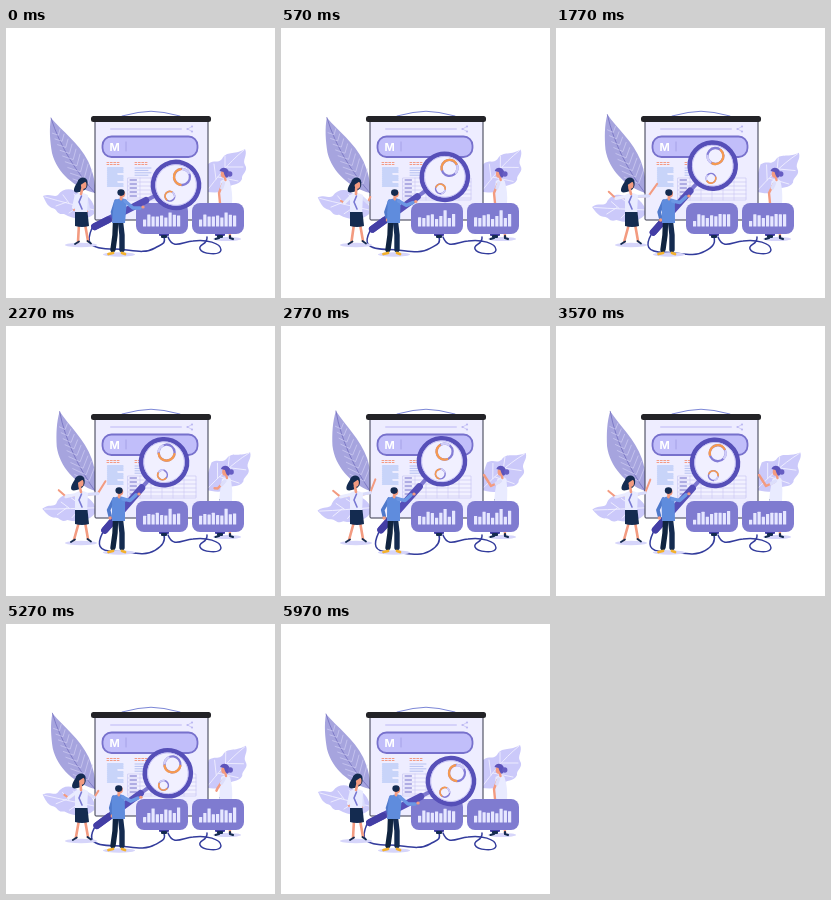
An HTML page with a canvas for the animation above (6010 ms loop, 269 px wide and 270 px high).

```html
<!DOCTYPE html>
<html lang="en">
<head>
<meta charset="utf-8">
<style>
html, body { margin: 0; width: 100%; height: 100%; overflow: hidden; background: #fff }
canvas { display: block; width: 269px; height: 270px }
</style>
</head>
<body>
<canvas id="stage"></canvas>
<script>
const LOOP = 6010, TAU = Math.PI * 2;
const canvas = document.getElementById('stage');
const c = canvas.getContext('2d');
const ratio = Math.max(1, window.devicePixelRatio || 1);
canvas.width = 269 * ratio;
canvas.height = 270 * ratio;
c.scale(ratio, ratio);
c.lineCap = c.lineJoin = 'round';

const NAVY = '#142b50', SKIN = '#f39b80', INK = '#433ea5', PURPLE = '#564fb8',
      PALE = '#cbc9fa', ORANGE = '#f5955c', SHIRT = '#e9ebff', SHADOW = '#d6d5fa',
      CABLE = '#333c9c';

function fill(d, color) { c.fillStyle = color; c.fill(new Path2D(d)); }
function stroke(d, color, width = 1) {
  c.strokeStyle = color;
  c.lineWidth = width;
  c.stroke(new Path2D(d));
}
const line = (color, width, ...pts) => stroke('M' + pts.join('L'), color, width);
function box(x, y, w, h, r, color, edge, width) {
  c.beginPath();
  c.roundRect(x, y, w, h, r);
  c.fillStyle = color;
  c.fill();
  if (edge) { c.strokeStyle = edge; c.lineWidth = width; c.stroke(); }
}
function oval(x, y, rx, ry, color) {
  c.beginPath();
  c.ellipse(x, y, rx, ry, 0, 0, TAU);
  c.fillStyle = color;
  c.fill();
}
function arc(x, y, r, from, to, color, width) {
  c.beginPath();
  c.arc(x, y, r, from, to);
  c.strokeStyle = color;
  c.lineWidth = width;
  c.stroke();
}
function turned(x, y, angle, draw) {
  c.save();
  c.translate(x, y);
  c.rotate(angle);
  draw();
  c.restore();
}
const smooth = (t, a, b) => {
  const k = Math.min(1, Math.max(0, (t - a) / (b - a)));
  return k * k * (3 - 2 * k);
};

// Closed smooth curve through values spread evenly over the loop.
function path(t, ...v) {
  const n = v.length, u = t / LOOP * n, i = Math.floor(u), f = u - i;
  const [a, b, d, e] = [n - 1, 0, 1, 2].map(k => v[(i + k) % n]);
  return b + f * (d - a + f * (2 * a - 5 * b + 4 * d - e + f * (3 * (b - d) + e - a))) / 2;
}

function leaves(p) {
  turned(89, 165, p * 0.13, () => {
    fill('M0 0C-20-5-38-20-43-40C-45-52-46-64-44-75C-33-62-16-50-7-32C-2-21 1-10 0 0Z', '#a6a4de');
    stroke('M0 0C-18-20-35-46-44-75', '#6f6bbd', .7);
    for (let i = 0; i < 9; i++) {
      const x = -7 - i * 3.7, y = -9 - i * 6.1, s = 1 - i * .075;
      line('#d5d3f6', .6, [x - 15 * s, y - 5 * s], [x, y], [x + 4 * s, y - 15 * s]);
    }
  });
  turned(88, 178, -p * 0.33, () => {
    fill('M0 8C-8 15-20 14-30 8C-38 9-36 3-42 2C-47 0-49-6-51-10C-43-13-40-8-36-11C-30-19-20-18-14-11C-6-12-2-6 0 0Z', PALE);
    stroke('M0 4C-15 0-32-4-49-9M-14 0L-25 7M-27-4L-38 0M-10 1L-20-12M-25-3L-31-11', '#f4f3ff', .8);
  });
  turned(200, 164, p * 0.146, () => {
    fill('M0 0C-2-10 0-18 2-28C9-33 11-28 16-33C21-42 27-36 39-43C42-37 36-32 39-27C43-21 35-18 36-13C33-6 25-9 20-3C14 2 6 0 0 0Z', PALE);
    stroke('M0 0C11-14 21-28 38-42M10-13L8-28M19-23L19-36M12-15L32-11M21-25L37-25', '#f4f3ff', .8);
  });
}

function board() {
  stroke('M116 88L132 84.5Q145 82 158 84.5L174 88', '#6c79d2', .9);
  box(89, 91, 113, 101, 1, '#eeedff', '#34364a', 1);
  box(85, 88, 120, 6, 2.5, '#232327');
  line('#d5d2fa', 2, [105, 101], [175, 101]);
  line('#c4c1f4', .8, [186, 98.5], [181.5, 101], [186, 103.5]);
  for (const [x, y] of [[186, 98.5], [181.5, 101], [186, 103.5]]) oval(x, y, 1.1, 1.1, '#bcb8f2');
  box(96.5, 108.5, 95, 20.5, 9, '#c1befa', '#7771cc', 1.8);
  c.fillStyle = '#fff';
  c.font = 'bold 11px Inter, "Liberation Sans", sans-serif';
  c.textAlign = 'center';
  c.fillText('M', 108.5, 122.5);
  line('#a09be3', .8, [120, 114], [120, 123]);

  for (const x of [101, 129]) for (const y of [134.5, 136.5])
    for (let i = 0; i < 4; i++) line('#f49b85', 1, [x + i * 3.4, y], [x + i * 3.4 + 1.8, y]);
  for (let i = 0; i < 10; i++) line('#a2bcf3', 1.2, [101.5, 140 + i * 2], [i % 4 === 3 ? 111 : 117, 140 + i * 2]);
  for (let i = 0; i < 4; i++) line('#a9b6ee', .8, [129, 140 + i * 2.4], [145 - i % 2 * 3, 140 + i * 2.4]);
  box(122, 150, 68, 22, 0, '#f2f1ff', '#c9c6f3', .7);
  for (let i = 0; i < 5; i++) {
    line('#c9c6f3', .7, [122, 154 + i * 4], [190, 154 + i * 4]);
    line('#c9c6f3', .6, [134 + i * 11, 150], [134 + i * 11, 172]);
    line('#6d68c8', 1, [124, 152 + i * 4], [130.5, 152 + i * 4]);
  }
}

const BARS = [7, 10, 12, 10, 9, 11, 14, 10, 13];
function panel(x, t) {
  box(x + 23, 203, 10, 5, 1, INK);
  box(x + 25, 207, 6, 3, 1, NAVY);
  box(x, 175, 52, 31, 8, '#7f7bd0');
  BARS.forEach((h, i) => {
    const high = h + 2.2 * Math.sin(t / LOOP * TAU * 3 + i * 2.1);
    box(x + 7 + i * 4.25, 198.5 - high, 3.2, high, .3, '#e6e7ff');
  });
}

function cables(endX, endY, p) {
  const low = 221 + p * 5;
  stroke(`M${endX} ${endY}C${endX - 6} ${low - 7} ${endX - 5} ${low} 108 ${low}C124 ${low} 137 ${low + 6} 149 ${low - 1}C156 ${low - 5} 160 216 158 209`, CABLE, 1.5);
  stroke('M162 209C167 222 176 214 187 213C200 211 215 215 215 222C214 228 196 226 194 221C192 216 202 217 201 209', CABLE, 1.5);
}

function ring(x, y, r, spin, width) {
  arc(x, y, r, 0, TAU, '#847dd6', width);
  arc(x, y, r, spin - 1.4, spin + 1.4, '#f79a4f', width);
  arc(x, y, r, spin + 1.7, spin + 2.6, '#d0cdf8', width);
}

function magnifier(x, y, endX, endY, spin) {
  const length = Math.hypot(endX - x, endY - y), angle = Math.atan2(endY - y, endX - x);
  turned(x, y, angle, () => {
    line('#7d77d0', 4, [24, 0], [35, 0]);
    line(PURPLE, 7, [34, 0], [length - 3, 0]);
    line(INK, 7, [length - 18, 0], [length - 3, 0]);
    oval(0, 0, 23, 23, '#f1f0ff');
    arc(0, 0, 23, 0, TAU, PURPLE, 4.6);
    arc(0, 0, 20.4, 0, TAU, '#bfbbf3', .8);
    ring(-9, 4.4, 8, spin - angle, 2.3);
    ring(10.6, -7.2, 4.8, spin - angle + .6, 1.6);
  });
}

function presenter(t) {
  const x = path(t, 75.5, 73, 72.5, 73, 73, 73);
  const lx = path(t, 68, 53, 53, 52, 53, 55), ly = path(t, 182, 165, 164, 165, 165, 167);
  const rx = path(t, 81, 97, 101, 93, 96, 96), ry = path(t, 183, 157, 156, 153, 155, 161);
  const foot = path(t, 71, 68, 67, 67, 67, 68);
  oval(75, 217, 16, 2.2, SHADOW);
  line(SKIN, 2.6, [73, 196], [foot + 1, 214]);
  line(SKIN, 2.6, [79, 196], [82, 213]);
  line(NAVY, 1.8, [foot + 2, 213.5], [foot - 2, 216]);
  line(NAVY, 1.8, [81.5, 213], [85, 215.5]);
  fill(`M${x - 4} 154C${x - 3} 148 ${x + 6} 148 ${x + 6} 154C${x + 7} 160 ${x + 3} 163 ${x - 2} 164C${x - 9} 166 ${x - 9} 161 ${x - 4} 154Z`, NAVY);
  const sleeve = [(67 + lx) / 2, (171 + ly) / 2 + 3], cuff = [(84 + rx) / 2, (174 + ry) / 2 + 3];
  line(SKIN, 2, [70, 169], sleeve, [lx, ly]);
  line(SHIRT, 3.2, [70, 168.5], sleeve);
  line(SKIN, 2, [80, 169], cuff, [rx, ry]);
  line('#d9dcfb', 3.2, [80, 168.5], cuff);
  fill('M69 167Q75 163 82 167L81 186H69Z', SHIRT);
  fill('M69 184H81.5L83 198Q76 200 69 198Z', NAVY);
  line('#7777d2', 1.6, [75.5, 168], [73, 174], [76, 181]);
  line(SKIN, 2.6, [x + 1, 160], [75, 166]);
  oval(x + 2.2, 157, 2.8, 3.7, SKIN);
  fill(`M${x - 3} 157Q${x - 1} 150 ${x + 5} 153Q${x + 2} 155 ${x - 1} 157Z`, NAVY);
}

function operator(t) {
  const x = path(t, 115, 112.5, 113, 113, 112, 112);
  const hx = path(t, 137, 133, 133, 133, 133, 134), hy = path(t, 179, 169, 168, 168, 168, 171);
  oval(113, 226.5, 16, 2.2, SHADOW);
  line('#10243f', 5.4, [109.5, 194], [109, 207], [107, 221.5]);
  line(NAVY, 5.4, [114.5, 194], [116, 207], [116, 221.5]);
  line('#f3b12c', 2.8, [107, 225], [102.5, 226]);
  line('#f3b12c', 2.8, [116, 225], [119, 226]);
  const lx = path(t, 107, 104, 103.5, 102, 103, 104.5);
  line('#4f79cb', 3.6, [x - 5, 173], [lx - .5, 184], [lx + 1, 190]);
  oval(lx + 1, 192, 1.7, 1.7, SKIN);
  fill(`M${x - 7} 173Q${x} 168 ${x + 6} 172L119 195H106Z`, '#5f8cdd');
  line('#6c97e4', 3.6, [x + 4, 173], [(x + hx) / 2 + 1, (175 + hy) / 2 + 3], [hx - 3, hy + 1]);
  oval(hx, hy, 1.7, 1.5, SKIN);
  line(SKIN, 2.8, [x + .5, 167], [x, 171]);
  oval(x + 1.2, 165.8, 3, 3.6, SKIN);
  oval(x, 164.6, 3.6, 3.3, NAVY);
}

function assistant(t) {
  const lift = smooth(t, 1850, 2700) * (1 - smooth(t, 4650, 5650));
  const x = 218.5 + path(t, 0, .5, 1.2, 2, 1.8, .8);
  const hx = 214 - lift * 11, hy = 175 - lift * 26;
  oval(221, 211, 14, 2, SHADOW);
  line(SKIN, 2.4, [217, 185], [213, 209]);
  line(SKIN, 2.4, [223, 185], [224, 209]);
  line(NAVY, 2.2, [214, 208], [213, 210], [209.5, 211]);
  line(NAVY, 2.2, [224, 208], [224, 210], [227, 211]);
  fill('M213 173H226L226 190H213Z', NAVY);
  fill(`M${x - 4} 153Q${x + 2} 149 ${x + 5} 153Q227 164 226 176H213Q214 163 ${x - 4} 153Z`, SHIRT);
  const elbow = [213 - lift * 3, 165 - lift * 5];
  line(SKIN, 2.4, [x - 2, 156], elbow, [hx, hy]);
  line('#dcdefb', 3.4, [x - 1, 155], [(x + elbow[0]) / 2, (155 + elbow[1]) / 2]);
  line(SKIN, 2.4, [x, 148], [x + 1, 152]);
  oval(x - 1, 146, 2.8, 3.7, SKIN);
  fill(`M${x - 5} 143C${x - 3} 137 ${x + 7} 140 ${x + 4} 148Q${x + 2} 152 ${x} 147L${x - 1} 144Z`, '#5d54bb');
  oval(x + 5.3, 146, 2.6, 2.8, '#665dc3');
}

function frame(now) {
  const t = now % LOOP, p = (1 - Math.cos(t / LOOP * TAU)) / 2;
  const lensX = path(t, 170, 158.3, 157, 161.5, 157, 159);
  const lensY = path(t, 157, 141.5, 137, 135.3, 139, 146);
  const endX = path(t, 86, 92, 96, 98, 96, 90);
  const endY = path(t, 200, 205.5, 206.5, 206, 206, 204.5);
  c.fillStyle = '#fff';
  c.fillRect(0, 0, 269, 270);
  leaves(p);
  board();
  assistant(t);
  cables(endX, endY, p);
  panel(130, t);
  panel(186, t);
  presenter(t);
  magnifier(lensX, lensY, endX, endY, Math.PI + t / LOOP * TAU * 2);
  operator(t);
  requestAnimationFrame(() => frame(performance.now() - start));
}
const start = performance.now();
frame(0);
</script>
</body>
</html>
```
